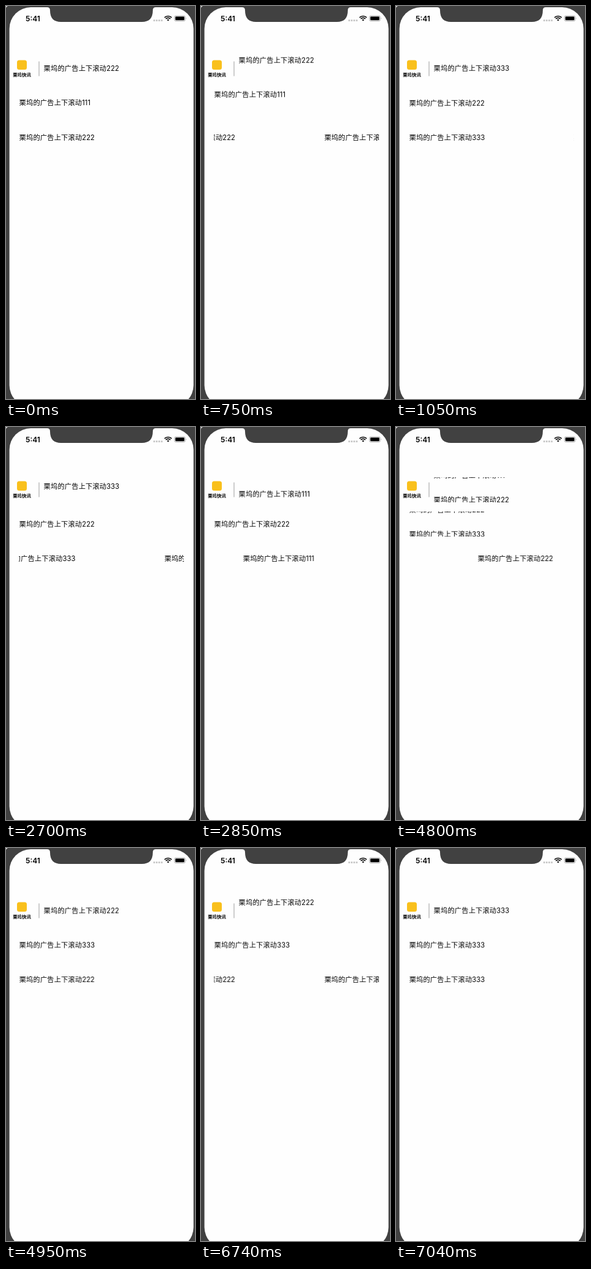
Animation, 309 px wide and 642 px high, one loop 8 s. Source, as an HTML page:

```html
<!DOCTYPE html>
<html lang="zh-CN">
<head>
<meta charset="utf-8">
<title>广告滚动</title>
<style>
  html, body { margin: 0; width: 100%; height: 100%; overflow: hidden; background: #414141; }
  svg { display: block; width: 309px; height: 642px; }
  text { font-family: Inter, "Noto Sans CJK SC", "Noto Sans CJK", sans-serif; fill: #000; }
  .line { font-size: 11.25px; }
  .words { letter-spacing: .16px; }
  .clock { font-size: 12px; font-weight: 600; text-anchor: middle; }
  .brand { font-size: 7.4px; font-weight: 700; text-anchor: middle; }
</style>
</head>
<body>
<svg viewBox="0 0 309 642">
  <defs>
    <clipPath id="clip0"><rect x="61.6" y="82" width="229.2" height="40.2"/></clipPath>
    <clipPath id="clip1"><rect x="21.6" y="138.2" width="269.2" height="40.2"/></clipPath>
    <clipPath id="clip2"><rect x="21.6" y="194.5" width="269.2" height="40.2"/></clipPath>
  </defs>

  <!-- phone -->
  <rect width="309" height="642" fill="#414141"/>
  <path d="M0 0H3Q1 1 0 3Z" fill="#ddd"/>
  <rect x="5.6" y="2" width="301" height="652.5" rx="35" fill="#fefefe"/>
  <path d="M67 1V2Q72 2 72 7C72 20 78 26 90 26H222C234 26 240 20 240 7Q240 2 245 2V1Z" fill="#414141"/>

  <!-- status bar -->
  <text class="clock" x="44" y="24.6">5:41</text>
  <path d="M241 23.6H256" stroke="#c4c4c4" stroke-width="2.6" stroke-dasharray="2.6 1.5"/>
  <g fill="none" stroke="#000" stroke-width="1.7">
    <path d="M259.2 18.9A8.2 8.2 0 0 1 270.8 18.9M261.2 21A5.3 5.3 0 0 1 268.8 21"/>
    <path d="M265 24.6L263.1 22.6A2.7 2.7 0 0 1 266.9 22.6Z" fill="#000" stroke="none"/>
  </g>
  <rect x="275.4" y="16" width="17.6" height="8.6" rx="2.2" fill="none" stroke="#999" stroke-width=".8"/>
  <rect x="276.8" y="17.3" width="14.8" height="6" rx="1.2"/>
  <path d="M294 18.8Q295.3 20.3 294 21.8Z" fill="#999"/>

  <!-- banner head -->
  <rect x="18" y="88.4" width="16" height="15.6" rx="3.5" fill="#f9c01c"/>
  <text class="brand" x="26" y="115">栗坞快讯</text>
  <path d="M54 90.5V114.5" stroke="#b8b8b8" stroke-width="1.4"/>

  <g id="rows"></g>
</svg>
<script>
const DURATION = 8000;
const PAGE_WIDTH = 269.2;
const ROW_HEIGHT = 40.2;
const WORDS = '栗坞的广告上下滚动';

// [time in ms, scroll position in pages]
const STEPS = [
  [0, 1], [750, 1.331], [900, 1.852], [1050, 2],
  [2700, 2.118], [2850, 2.825], [3000, 3],
  [4800, 3.584], [4950, 4],
  [6740, 4.331], [6890, 4.852], [7040, 5], [DURATION, 5]
];

const unit = v => Math.min(1, Math.max(0, v));
const everyPage = p => p;
const everyOtherPage = p => unit(p - 1) + unit(p - 3);

const ROWS = [
  { x: 61.6, y: 82, dx: 0, dy: ROW_HEIGHT, position: everyPage },
  { x: 21.6, y: 138.2, dx: 0, dy: ROW_HEIGHT, position: everyOtherPage },
  { x: 21.6, y: 194.5, dx: PAGE_WIDTH, dy: 0, position: everyPage }
];

function add(parent, tag, attrs, text = '') {
  const el = document.createElementNS('http://www.w3.org/2000/svg', tag);
  for (const name in attrs) el.setAttribute(name, attrs[name]);
  el.textContent = text;
  return parent.appendChild(el);
}

ROWS.forEach(({ x, y, dx, dy, position }, i) => {
  const view = add(document.getElementById('rows'), 'g', { 'clip-path': `url(#clip${i})` });
  const strip = add(view, 'g', {});
  for (let page = 0; page < 7; page++) {
    const line = add(strip, 'text', {
      class: 'line', x: x + page * dx, y: y + ROW_HEIGHT / 2 + 4.1 + page * dy
    });
    add(line, 'tspan', { class: 'words' }, WORDS);
    add(line, 'tspan', {}, String(page % 3 + 1).repeat(3));
  }
  strip.animate(STEPS.map(([time, p]) => ({
    offset: time / DURATION,
    easing: 'step-end',
    transform: `translate(${-position(p) * dx}px, ${-position(p) * dy}px)`
  })), { duration: DURATION, iterations: Infinity });
});
</script>
</body>
</html>
```
